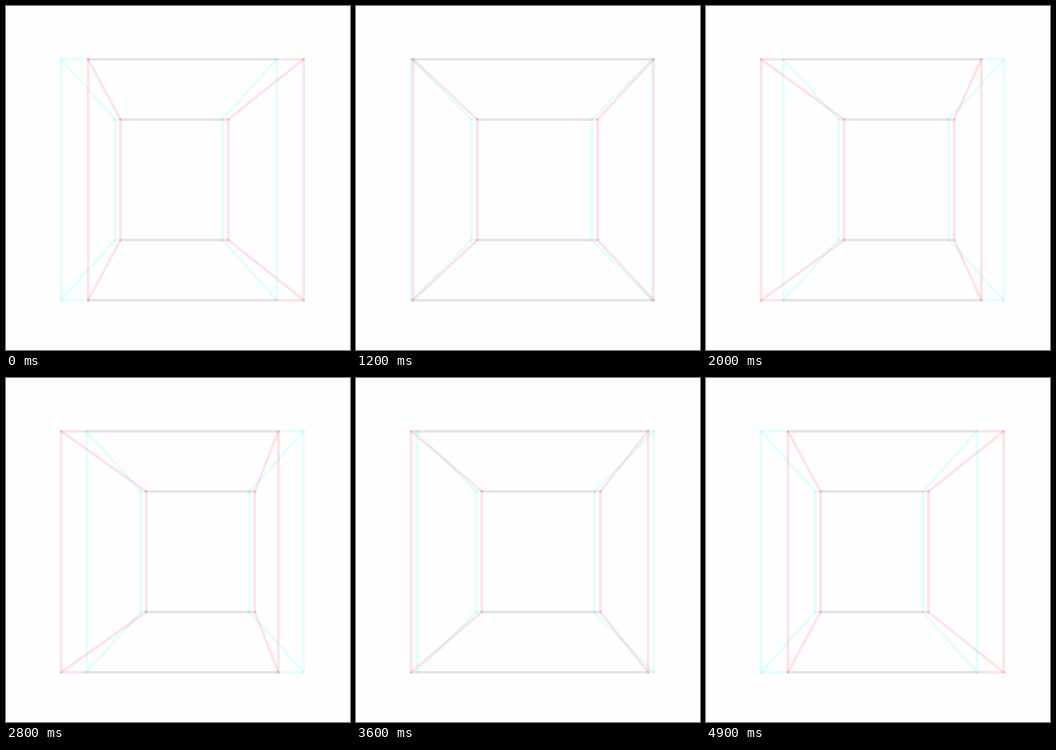
Animation, 748 px wide and 748 px high, one loop 5000 ms. Source, as an HTML page with a canvas:

```html
<!DOCTYPE html>
<html>
<head>
<meta charset="utf-8">
<style>
html, body { margin: 0; height: 100%; overflow: hidden; background: #fefefe; }
canvas { display: block; }
</style>
</head>
<body>
<canvas id="stage" width="748" height="748"></canvas>
<script>
const ctx = document.getElementById('stage').getContext('2d');
const LEFT = 120, SPAN = 527.3, TOP = 115.8, HEIGHT = 524;
const LOOP = 5000, STEP = 100;

function line(a, b) {
  ctx.beginPath();
  ctx.moveTo(...a);
  ctx.lineTo(...b);
  ctx.stroke();
}

// Corners of a rectangle; inset is a fraction of the front face
function face(x, w, inset) {
  const l = x + w * inset, r = x + w * (1 - inset);
  const t = TOP + HEIGHT * inset, b = TOP + HEIGHT * (1 - inset);
  return [[l, t], [r, t], [r, b], [l, b]];
}

function box(frontX, backX, w, color) {
  const front = face(frontX, w, 0), back = face(backX, w, 0.25);
  ctx.strokeStyle = color;
  for (let i = 0; i < 4; i++) {
    const j = (i + 1) % 4;
    line(front[i], front[j]);
    line(back[i], back[j]);
    line(front[i], back[i]);
  }
}

function draw(now) {
  const t = Math.floor(now % LOOP / STEP) * STEP;
  const shift = 0.125 * Math.cos(2 * Math.PI * t / LOOP);
  // Both boxes together always fill the same span
  const w = SPAN / (1 + Math.abs(shift));
  const cyanX = LEFT + w * Math.max(0, -shift);
  const redX = LEFT + w * Math.max(0, shift);

  ctx.clearRect(0, 0, 748, 748);
  ctx.lineWidth = 5.8;
  ctx.lineCap = 'round';
  box(cyanX, cyanX, w, 'rgba(0,255,255,0.1)');
  box(redX, cyanX + w * 0.025, w, 'rgba(255,0,0,0.1)');
}

const start = performance.now();
function tick() {
  draw(performance.now() - start);
  requestAnimationFrame(tick);
}
tick();
</script>
</body>
</html>
```
